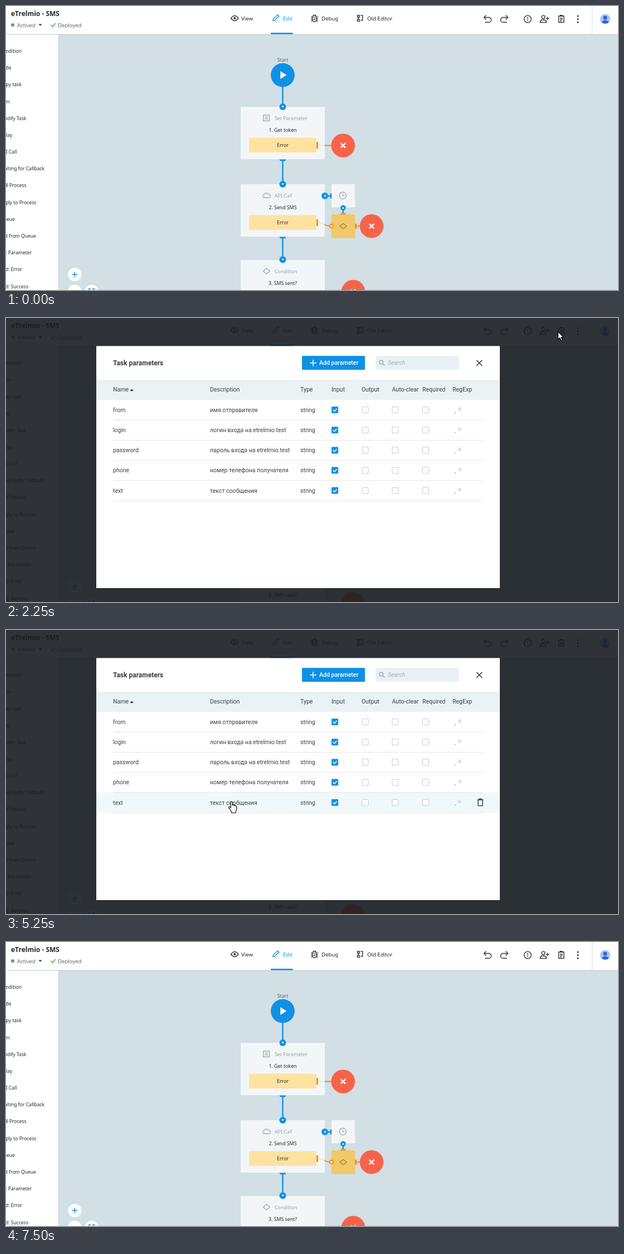
An HTML page for the animation above (8250 ms loop, 1098 px wide and 510 px high).

```html
<!DOCTYPE html>
<html lang="en">
<head>
<meta charset="utf-8">
<title>Process editor</title>
<style>
  html, body { margin: 0; width: 100%; height: 100%; overflow: hidden; background: #fff; }
  svg { display: block; width: 1098px; height: 510px; }
  text { font-family: "Noto Sans", "Open Sans", sans-serif; font-size: 8.8px; fill: #23272b; }
  .nav { font-size: 9.6px; }
  .side { font-size: 8.55px; }
  .grey { fill: #98a2a9; }
  .ui { font-family: Roboto, Arial, sans-serif; font-size: 10.56px; fill: #3a3f44; }
  .mid { text-anchor: middle; }
  .icon { fill: none; stroke: #2f3438; stroke-width: 1.4; }
</style>
</head>
<body>
<svg id="stage" viewBox="0 0 1098 510"></svg>
<script>
const BLUE = '#0f91e6', ORANGE = '#fb8c1e', RED = '#f7634a', CARD = '#f2f6f8';
const LOOP = 8250, STEP = 250, ROW = 36.2;

const rect = (x, y, w, h, fill, more = '') =>
  `<rect x="${x}" y="${y}" width="${w}" height="${h}" fill="${fill}" ${more}/>`;
const dot = (x, y, r, fill, more = '') => `<circle cx="${x}" cy="${y}" r="${r}" fill="${fill}" ${more}/>`;
const fill = (d, color) => `<path d="${d}" fill="${color}"/>`;
const line = (d, color, w = 1.4) => `<path d="${d}" fill="none" stroke="${color}" stroke-width="${w}"/>`;
const icon = d => `<path class="icon" d="${d}"/>`;
const text = (x, y, s, cls = '', more = '') => `<text x="${x}" y="${y}" class="${cls}" ${more}>${s}</text>`;
const cross = (x, y, r, color, w) =>
  line(`M${x - r} ${y - r}l${2 * r} ${2 * r}m0 ${-2 * r}l${-2 * r} ${2 * r}`, color, w);
const plus = (x, y, r, color) => line(`M${x - r} ${y}h${2 * r}M${x} ${y - r}v${2 * r}`, color, 1.5);

// Flow chart parts
const port = (x, y, angle, r = 6) => dot(x, y, r, BLUE) +
  `<path d="M-2.3-1.4h4.6l-2.3 3z" fill="#fff" transform="translate(${x} ${y}) rotate(${angle})"/>`;
const stop = (x, y) => dot(x, y, 21.3, RED) + cross(x, y, 4.2, '#fff', 2.4);
const link = (y1, y2) => line(`M496.5 ${y1}V${y2}`, BLUE, 2.4) + port(496.5, y2, 0);
const box = (x, y, w, h, color) =>
  rect(x, y + .7, w, h, '#b9c6cd', 'rx="1.5" opacity=".6"') + rect(x, y, w, h, color, 'rx="1.5"');

function card(y, kind, name) {
  return box(421, y, 151, 94.5, CARD) + text(482, y + 24.2, kind, 'grey') +
    text(496.5, y + 45.2, name, 'mid') + rect(436, y + 55.5, 121, 26.5, '#ffe2a0', 'rx="1.5"') +
    text(496.5, y + 72, 'Error', 'mid') + rect(557, y + 63, 3, 12, ORANGE) +
    fill(`M490.5 ${y + 94.5}h12q-1 3-3 3h-6q-2 0-3-3z`, BLUE);
}

function header() {
  const ink = '#2f3438';
  return rect(0, 0, 1098, 50.5, '#fff') + line('M0 50.8H1098', '#c3ced4', .8) +
    text(9, 18, 'eTrelmio - SMS', '', 'style="font-size:12px;font-weight:700"') +
    dot(12, 34, 3, '#4caf50') + text(20, 37.6, 'Actived', 'nav', 'fill-opacity=".72"') +
    fill('M58 32.3h7l-3.5 4z', '#59636a') + line('M80.5 34l3 3 5.5-6', '#4caf50', 1.7) +
    text(93, 37.6, 'Deployed', 'nav', 'fill-opacity=".72"') +
    icon('M403.5 22q6.7-9 13.4 0q-6.7 9-13.4 0z') + dot(410.2, 22, 2.1, ink) +
    text(422, 25.6, 'View', 'nav') +
    line('M479 26.5l.8-3.4 7.4-7.4 2.6 2.6-7.4 7.4z', BLUE) +
    text(497, 25.6, 'Edit', 'nav', `style="fill:${BLUE}"`) + rect(475, 48, 39.5, 2.6, BLUE) +
    icon('M550 20.5a3.5 3 0 0 1 7 0v4a3.5 3.8 0 0 1-7 0zM547.3 19l2.7 1.5M547 23h3M547.3 27.5l2.7-2M559.7 19l-2.7 1.5M560 23h-3M559.7 27.5l-2.7-2M550.8 15.5l1.4 2.2M556.2 15.5l-1.4 2.2M552 21.5h3M552 24.5h3') +
    text(566, 25.6, 'Debug', 'nav') +
    icon('M630.5 16.7h3.6v3.6h-3.6zM630.5 24h3.6v3.6h-3.6zM632.3 20.3V24M636.3 17h3.4v8.8h-3.4') +
    text(648, 25.6, 'Old Editor', 'nav') +
    icon('M861.5 16.5l-4 4 4 4M857.5 20.5h8.7a4.4 4.4 0 0 1 0 8.8h-6.7M896.5 16.5l4 4-4 4M900.5 20.5h-8.7a4.4 4.4 0 0 0 0 8.8h6.7') +
    dot(936, 23.5, 6.4, 'none', 'class="icon"') + icon('M936 20v4.5M936 25.8v1.5') +
    dot(964, 19.8, 2.9, 'none', 'class="icon"') +
    icon('M958.3 29.5q0-4.7 5.7-4.7t5.7 4.7zM971.5 19.5v5.4M968.8 22.2h5.4') +
    rect(984, 11.5, 24.5, 24.5, '#e6eef1', 'id="hot"') +
    icon('M991.6 18h9.2v11.5h-9.2zM994 22h4.6M994 24.4h4.6M994 26.8h3') + rect(994, 16, 4.4, 3, ink) +
    [18, 23.5, 29].map(y => dot(1026, y, 1.5, ink)).join('') +
    line('M1051.5 0V50', '#d9e0e4', 1) +
    dot(1075, 23.5, 9.3, '#a9c7fa') + dot(1075, 21, 3.6, '#2f62d0') +
    fill('M1068.5 29q2.5-3.5 6.5-3.5t6.5 3.5q-6 5-13 0z', '#2f62d0');
}

function sidebar() {
  const items = ['Condition', 'Code', 'Copy task', 'Sum', 'Modify Task', 'Delay', 'API Call',
    'Waiting for Callback', 'Call Process', 'Reply to Process', 'Queue', 'Get from Queue',
    'Set Parameter', 'End: Error', 'End: Success'];
  return rect(0, 51, 93.5, 459, '#fff') +
    items.map((s, i) => text(-11, 84 + i * 30.18, s, 'side')).join('');
}

function chart() {
  const pale = '#f6dcb9';
  return text(496.5, 100.3, 'Start', 'mid', 'style="fill:#5b666d"') +
    dot(496.5, 124, 21.4, BLUE) + fill('M492.3 117v14l11-7z', '#fff') +
    card(181, 'Set Parameter', '1. Get token') + card(320, 'API Call', '2. Send SMS') +
    box(421, 456, 151, 94.5, CARD) + text(482, 480, 'Condition', 'grey') +
    text(496.5, 500.8, '3. SMS sent?', 'mid') +
    line('M461.8 195.8h10.6v10.6h-10.6zM464.3 199.2h5.6M464.3 202.5h5.6', '#98a2a9', 1.3) +
    line('M463.5 344.3a2.8 2.8 0 0 1-.3-5.8a4.4 4.4 0 0 1 8-.4a3.1 3.1 0 0 1 0 6.2z', '#98a2a9', 1.2) +
    line('M461.5 476l6-5 6 5-6 5z', '#98a2a9', 1.2) +
    link(145, 181) + link(277, 320) + link(416, 455.5) +
    line('M560 250.5H572', pale) + line('M572 250.5H584', ORANGE, 2.2) + stop(604.8, 250.5) +
    box(584, 320, 42.3, 42, CARD) + dot(604.3, 340.5, 6.2, 'none', 'stroke="#98a2a9" stroke-width="1.3"') +
    line('M604.3 337v3.8h3.2', '#98a2a9', 1.2) +
    line('M572 341H583', BLUE, 2.4) + rect(581.5, 336.5, 2.7, 9, BLUE) + port(572, 341, 90) +
    box(584, 374, 42.3, 42.5, '#f2c868') + line('M599 395.3l6-4.6 6 4.6-6 4.6z', '#967a3b', 1.2) +
    line('M604.8 362v10', BLUE, 2.4) + port(604.8, 362.3, 180, 4.8) + rect(600.5, 371.5, 9, 2.7, ORANGE) +
    line('M560 388.5q5 1 12 4', pale) + line('M571.5 392.3q5 2.7 9 2.9', ORANGE, 2) +
    dot(584, 395.2, 3.2, '#ffe2a0', `stroke="${ORANGE}" stroke-width="1.8"`) +
    rect(626, 391, 3, 9, ORANGE) + line('M629 395.3h7', ORANGE, 2.2) + stop(656, 395.3) +
    stop(623, 513) +
    dot(123.3, 482.3, 12, '#fff') + plus(123.3, 482.3, 5, BLUE) +
    dot(123.3, 512.5, 12, '#fff') + dot(153.5, 512.5, 12, '#fff') +
    line('M149 510.5v-3h3M155 507.5h3v3', BLUE, 1.5);
}

function check(x, y, on) {
  return on ? rect(x, y - 6, 12, 12, BLUE, 'rx="1.2"') + line(`M${x + 2.8} ${y}l2.5 2.5 4.2-4.7`, '#fff', 1.5)
    : rect(x + .5, y - 5.5, 11, 11, '#fff', 'rx="1" stroke="#c6cacd"');
}

function tableRow([name, note], i) {
  const y = 165 + i * ROW;
  return text(192, y + 3.7, name, 'ui') + text(366, y + 3.7, note, 'ui') + text(528, y + 3.7, 'string', 'ui') +
    [584, 638.5, 692.5, 747].map((x, n) => check(x, y, n == 0)).join('') +
    dot(806, y + 4.6, 1.6, '#d3d7da') +
    line(`M814 ${y - 5.5}v8M810.5 ${y - 3.5}l7 4M817.5 ${y - 3.5}l-7 4`, '#d3d7da', 1.2) +
    line(`M192 ${y + 18.3}H856`, '#e0e5e8', 1);
}

function dialog() {
  const heads = [[192, 'Name'], [366, 'Description'], [528, 'Type'], [584, 'Input'], [638, 'Output'],
    [692.5, 'Auto-clear'], [747, 'Required'], [801, 'RegExp']];
  const rows = [['from', 'имя отправителя'], ['login', 'логин входа на etrelmio.test'],
    ['password', 'пароль входа на etrelmio.test'], ['phone', 'номер телефона получателя'],
    ['text', 'текст сообщения']];
  return `<path d="M-200-300H1300V900H-200zM162 50.5H886V485H162z" fill="#191d23" fill-opacity=".9" fill-rule="evenodd"/>` +
    rect(162, 50.5, 724, 434.5, '#fff', 'rx="1.5"') +
    text(192, 84.7, 'Task parameters', 'ui', 'style="font-size:12px;font-weight:700"') +
    rect(531, 68, 113, 25, BLUE, 'rx="1.5"') + plus(551, 80.7, 5.7, '#fff') +
    text(562, 84.4, 'Add parameter', 'ui', 'style="fill:#fff;font-weight:500"') +
    rect(663, 68, 150, 25, '#e9f1f5', 'rx="1.5"') +
    dot(673.3, 79.5, 3.5, 'none', 'stroke="#9ba8b0" stroke-width="1.4"') + line('M676 82.2l3.3 3.3', '#9ba8b0', 1.6) +
    text(685, 84.2, 'Search', 'ui', 'style="fill:#a3afb6;font-style:italic"') +
    `<g id="close" stroke="#2f3438">${cross(849.2, 80.7, 5, 'inherit', 1.5)}</g>` +
    rect(162, 111, 724, 36, '#eaf2f5') + heads.map(([x, s]) => text(x, 132.2, s, 'ui')).join('') +
    fill('M222.5 131h6.4l-3.2-3.8z', '#2f3438') +
    `<g id="hover">${rect(162, 147, 724, 36.2, '#f1f8fb')}
      ${icon('M845.5 160.2h11M849 160v-1.6h4v1.6M847 160.5v10.3h8v-10.3')}
      <path id="caret" d="M557.8 163.6h6.4l-3.2 3.8z" fill="#6a737a"/></g>` +
    rows.map(tableRow).join('');
}

const $ = id => document.getElementById(id);
$('stage').innerHTML = rect(0, 0, 1098, 510, '#d2dfe5') + chart() + sidebar() + header() +
  `<g id="tip">${fill('M992.5 40.5l4-4 4 4z', '#000')}${rect(962, 40, 69, 16, '#000')}
    ${text(996.5, 51, 'Task parametrs', 'ui mid', 'style="fill:#fff;font-size:8.1px;font-weight:700"')}</g>
  <g id="dialog">${dialog()}</g>
  <g id="cursor" stroke="#000" fill="#fff" stroke-width="1.1" stroke-linejoin="round">
    <path id="arrow" d="M.5.5v14l3.2-3 2.2 5 2.3-1-2.2-4.9h4.3z"/>
    <path id="hand" d="M-1.7 11.5V2q0-1.7 1.5-1.7T1.4 2v5q.2-1 1.5-.9t1.4 1.3q.3-.9 1.4-.7t1.3 1.4q1.7-.4 1.7 1.4v4q0 3-1.7 4.7v2.3h-7.2v-2q-2-2.2-3-4.4l-2-3q-.6-1.2.4-1.7t2 .6z"/>
  </g>`;

// Pointer path: time, x, y of the tip
const path = [[250, 594, 46], [500, 800, 40], [750, 960, 29], [1000, 1002, 20], [1750, 1002, 20],
  [2000, 997, 20], [2250, 990, 24], [3000, 490, 183], [4000, 405, 190], [4250, 405, 210],
  [5000, 405, 300], [5250, 405, 308], [5500, 405, 308], [6250, 890, 120], [6500, 859, 78], [7500, 859, 78]];

function pointer(t) {
  const i = Math.max(1, path.findIndex(p => p[0] >= t));
  const [a, b] = [path[i - 1], path[i]];
  const k = (t - a[0]) / (b[0] - a[0]);
  return [a[1] + (b[1] - a[1]) * k, a[2] + (b[2] - a[2]) * k];
}
const show = (id, on) => $(id).setAttribute('display', on ? 'inline' : 'none');
const move = (id, x, y) => $(id).setAttribute('transform', `translate(${x} ${y})`);

function draw(time) {
  const t = Math.floor(time % LOOP / STEP) * STEP;
  const seen = t >= 250 && t < 7500;
  const [x, y] = pointer(Math.min(Math.max(t, 250), 7500));
  const hand = t >= 1000 && t < 2000 || t >= 3250 && t < 5750 || t >= 6500;
  show('cursor', seen);
  move('cursor', x, y);
  show('hand', hand);
  show('arrow', !hand);

  show('hot', t >= 1000 && t < 2000);
  show('tip', t >= 1000 && t < 2250);
  $('tip').setAttribute('opacity', t < 2000 ? 1 : .15);

  const [alpha, lift] = t == 2000 ? [.6, -6] : t == 7000 ? [.4, -67.3] : [1, 0];
  show('dialog', t >= 2000 && t < 7250);
  $('dialog').setAttribute('opacity', alpha);
  move('dialog', 0, lift);
  $('close').setAttribute('stroke', t >= 6500 ? BLUE : '#2f3438');

  const row = Math.floor((y - 147) / ROW);
  show('hover', t >= 2250 && t < 7000 && x < 886 && row >= 0 && row < 5);
  show('caret', !hand);
  move('hover', 0, row * ROW);
}

const began = performance.now();
function tick() {
  draw(performance.now() - began);
  requestAnimationFrame(tick);
}
draw(0);
requestAnimationFrame(tick);
</script>
</body>
</html>
```
